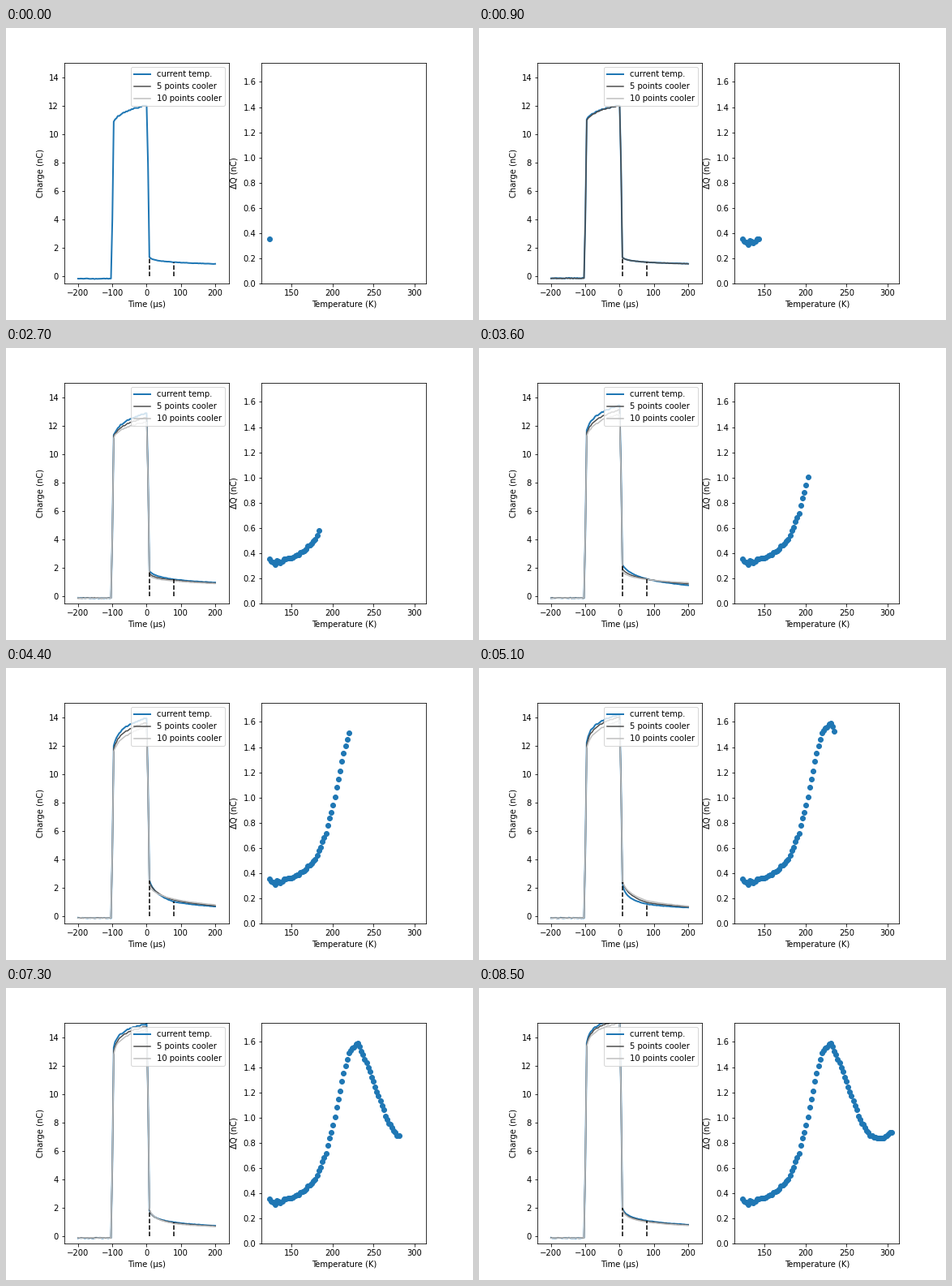
Write a matplotlib script that moves like this. It is 576 by 360 pixels and loops after 8600 ms.

```python
import numpy as np
import matplotlib.pyplot as plt
from matplotlib.animation import FuncAnimation

FRAMES, STEP = 86, 100
steps = np.arange(FRAMES)


def track(*points):
    """One value per step, joined by straight lines between key points."""
    return np.interp(steps, *zip(*points))


temp = 123 + 2.27 * steps - 0.0015 * steps**2

# charge lost between 8 and 80 µs: slow start, steep climb, peak, decline
loss = track((0, .36), (3, .305), (4, .35), (6, .325), (9, .36), (13, .365),
             (18, .41), (25, .505), (31, .72), (35, .94), (41, 1.35),
             (44, 1.515), (49, 1.595), (55, 1.4), (66, .98), (72, .855),
             (79, .835), (85, .88))
loss += np.random.default_rng(3).uniform(-0.007, 0.007, FRAMES)

# pulse plateau: level at both ends and how gently it bends
start = track((0, 10.9), (27, 11.35), (51, 12.25), (73, 13.3), (85, 13.6))
end = track((0, 12), (9, 12.02), (18, 12.3), (45, 14), (63, 14.55), (85, 15.4))
bend = track((30, 12), (50, 4))

# discharge tail: level at 80 and 200 µs, and log-time shift
q80 = track((9, 1), (27, 1.2), (36, 1.22), (51, .86), (63, .9), (85, 1.1))
q200 = track((0, .88), (18, .9), (27, .97), (36, .78), (51, .62), (85, .82))
shift = track((18, -4), (36, 6), (51, -6), (85, -4))

t = np.arange(-200, 201, 4)
pulse = (t >= -96) & (t <= 0)
tail = t >= 8


def log_ramp(x, x0, x1):
    """0 at x0, 1 at x1, straight on a log scale."""
    return np.log(x / x0) / np.log(x1 / x0)


def charge(i):
    noise = np.random.default_rng(i).normal(0, 0.012, t.size)
    q = -0.11 - 0.05 * np.exp(-i / 8) + noise

    b = bend[i]
    top = start[i] + (end[i] - start[i]) * log_ramp(t[pulse] + 96 + b, b, 96 + b)
    q[pulse] = np.round((top + noise[pulse]) / 0.08) * 0.08
    q[t == -100] = 0.37 * start[i]
    q[t == 4] = 0.66 * end[i]

    s, x = shift[i], t[tail]
    early = loss[i] * log_ramp(x + s, 80 + s, 8 + s)
    late = (q200[i] - q80[i]) * log_ramp(x + s, 80 + s, 200 + s)
    q[tail] = q80[i] + np.where(x < 80, early, late) + noise[tail] / 2
    return q


curves = [charge(i) for i in range(FRAMES)]

plt.rcParams["font.family"] = "DejaVu Sans"
fig, (left, right) = plt.subplots(1, 2, figsize=(8, 5), dpi=72)
fig.subplots_adjust(left=0.125, right=0.9, bottom=0.125, top=0.88, wspace=0.2)

left.set(xlim=(-240, 240), ylim=(-0.5, 15),
         xlabel="Time (µs)", ylabel="Charge (nC)")
right.set(xlim=(113.9, 314.1), ylim=(0, 1.75), xlabel="Temperature (K)")
right.set_ylabel("ΔQ (nC)", labelpad=6)

now, = left.plot([], [], color="C0", lw=2, label="current temp.")
cool5, = left.plot([], [], color="0.3", lw=1.5, label="5 points cooler")
cool10, = left.plot([], [], color="0.75", lw=1.5, label="10 points cooler")
marks = [left.plot([], [], "k--", lw=1.5)[0] for _ in range(2)]
left.legend(loc="upper right")
dots, = right.plot([], [], "o", color="C0")


def update(i):
    for line, lag in ((now, 0), (cool5, 5), (cool10, 10)):
        if i >= lag:
            line.set_data(t, curves[i - lag])
        else:
            line.set_data([], [])
    for mark, x in zip(marks, (8, 80)):
        mark.set_data([x, x], [0, curves[i][t == x][0]])
    dots.set_data(temp[:i + 1], loss[:i + 1])
    return [now, cool5, cool10, dots, *marks]


anim = FuncAnimation(fig, update, frames=FRAMES, interval=STEP,
                     init_func=lambda: update(0), repeat=True, repeat_delay=0)
plt.show()
```
